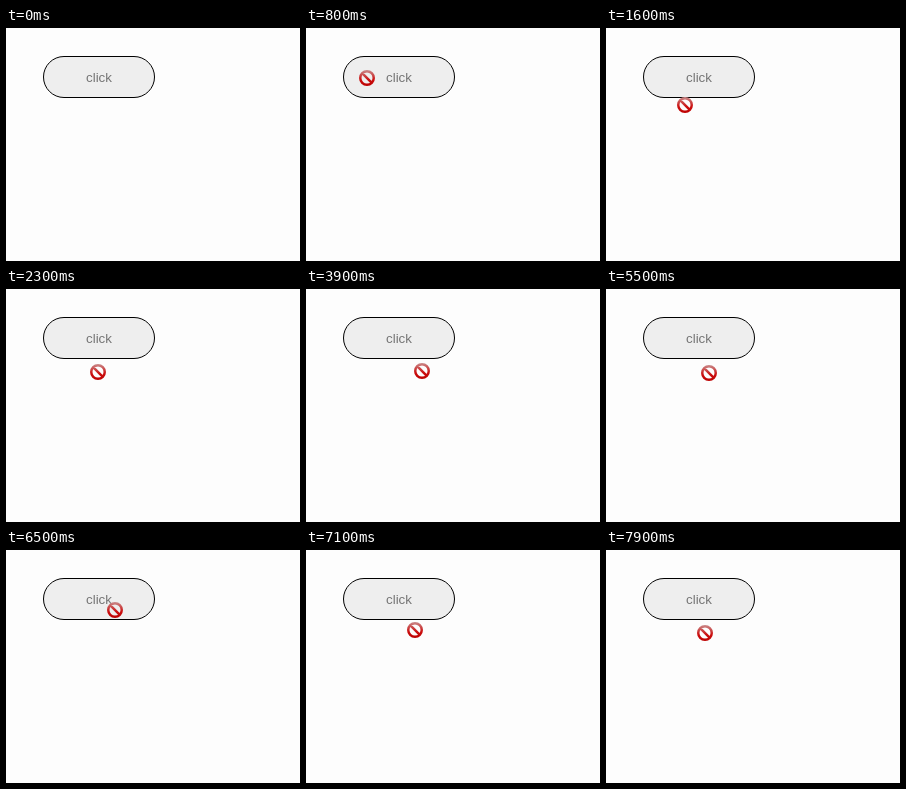
Recreate the animation shown at these times as an HTML page with a canvas. Size 294 by 233 pixels, loop 8 s.

```html
<!DOCTYPE html>
<html lang="en">
<head>
<meta charset="utf-8">
<title>Disabled button</title>
<style>
  html, body { margin: 0; width: 100%; height: 100%; overflow: hidden; background: #fdfdfd; }
  canvas { display: block; width: 294px; height: 233px; }
</style>
</head>
<body>
<canvas id="stage"></canvas>
<script>
const W = 294, H = 233, LOOP = 8000, STEP = 100;
const APPEAR = 200, ENTRY = [240, 98];
// Below this line the ordinary arrow is shown
const ARROW_Y = 85;

const canvas = document.getElementById('stage');
const ctx = canvas.getContext('2d');
const ratio = window.devicePixelRatio || 1;
canvas.width = W * ratio;
canvas.height = H * ratio;
ctx.scale(ratio, ratio);

// Each move glides the pointer to a new spot; it rests in between
const move = (begin, end, x, y) => ({ begin, end, x, y });
const moves = [
  move(200, 300, 134, 125),
  move(300, 800, 61, 50),
  move(1200, 1900, 90, 95),
  move(2000, 2300, 92, 83),
  move(3200, 3400, 114, 82),
  move(3500, 3700, 119, 82),
  move(3800, 4400, 77, 79),
  move(4500, 4700, 67, 81),
  move(5000, 5500, 103, 84),
  move(5500, 5700, 106, 84),
  move(5900, 6200, 109, 64),
  move(6300, 6500, 109, 60),
  move(6800, 7100, 109, 80),
  move(7400, 7600, 110, 82),
  move(7700, 7900, 99, 83)
];

const clamp = k => Math.min(1, Math.max(0, k));
const ease = k => k * k * (3 - 2 * k);

function pointerAt(t) {
  let [x, y] = ENTRY;
  for (const m of moves) {
    const k = ease(clamp((t - m.begin) / (m.end - m.begin)));
    x += (m.x - x) * k;
    y += (m.y - y) * k;
  }
  return [Math.round(x), Math.round(y)];
}

function drawButton() {
  ctx.beginPath();
  ctx.roundRect(37.5, 28.5, 111, 41, 20.5);
  ctx.fillStyle = '#eee';
  ctx.fill();
  ctx.strokeStyle = '#000';
  ctx.lineWidth = 1;
  ctx.stroke();
  ctx.font = '13.333px "Liberation Sans", Arial, sans-serif';
  ctx.fillStyle = '#757575';
  ctx.fillText('click', 80, 54);
}

function drawForbidden() {
  const red = ctx.createLinearGradient(0, -8, 0, 8);
  red.addColorStop(0, '#c98c8c');
  red.addColorStop(0.6, '#cc1010');
  red.addColorStop(1, '#bc0000');
  ctx.strokeStyle = red;
  ctx.lineWidth = 2.5;
  ctx.beginPath();
  ctx.arc(0, 0, 6.75, 0, Math.PI * 2);
  ctx.moveTo(-4.8, -4.8);
  ctx.lineTo(4.8, 4.8);
  ctx.stroke();
}

function drawArrow() {
  const outline = new Path2D('M.5 .5V16L4 12.7L6.7 19L9.3 18L6.7 11.8H11.5Z');
  ctx.fillStyle = '#fff';
  ctx.fill(outline);
  ctx.strokeStyle = '#222';
  ctx.lineWidth = 1;
  ctx.stroke(outline);
}

function draw(t) {
  ctx.fillStyle = '#fdfdfd';
  ctx.fillRect(0, 0, W, H);
  drawButton();
  if (t < APPEAR) return;
  const [x, y] = pointerAt(t);
  ctx.save();
  ctx.translate(x, y);
  if (y > ARROW_Y) drawArrow();
  else drawForbidden();
  ctx.restore();
}

const start = performance.now();

function frame() {
  const t = (performance.now() - start) % LOOP;
  draw(Math.floor(t / STEP) * STEP);
  requestAnimationFrame(frame);
}
frame();
</script>
</body>
</html>
```
